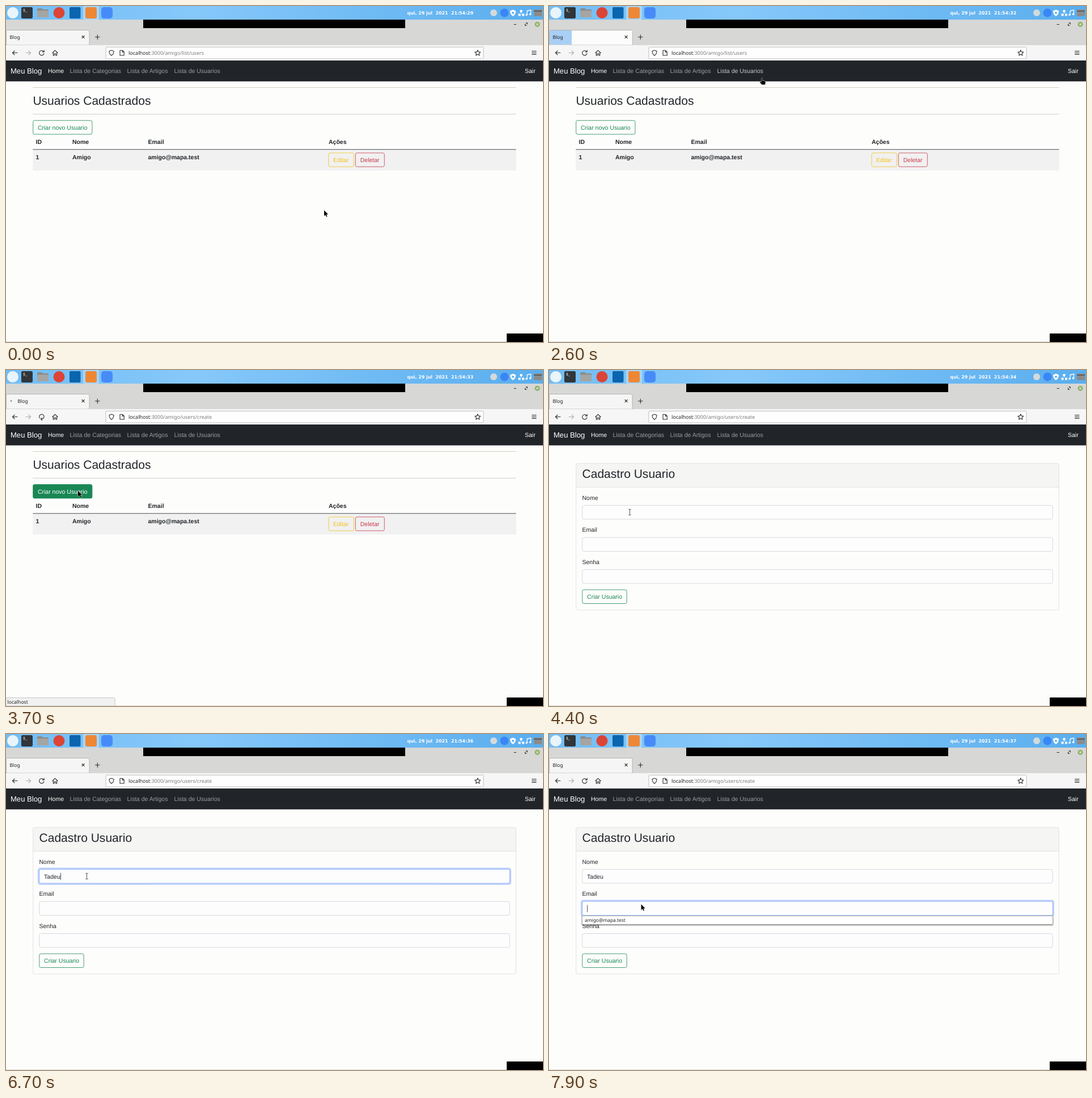
Write an HTML page that moves like this. It is 947 px wide and 592 px high and loops after 8000 ms.

```html
<!DOCTYPE html>
<html lang="pt-BR">
<head>
<meta charset="utf-8">
<title>Blog</title>
<style>
  html, body { margin: 0; width: 100%; height: 100%; overflow: hidden; background: #fdfdfc; }
  svg { display: block; width: 947px; height: 592px; }
  text { white-space: pre; text-rendering: geometricPrecision; }
  .web { font: 10.52px "Liberation Sans", Arial, sans-serif; fill: #212529; }
  .web .title { font-size: 21.04px; }
  .web .bold { font-weight: bold; }
  .ui { font: 8.6px "Noto Sans", "Open Sans", sans-serif; fill: #222; }
  .clock { font: bold 7.9px "DejaVu Sans", sans-serif; fill: #fff; }
  .line { fill: none; stroke: #2b2b2b; stroke-width: 1.1; stroke-linecap: round; stroke-linejoin: round; }
  .btn rect { fill: none; stroke: currentColor; stroke-width: .8; }
  .btn text { fill: currentColor; }
  .btn.hover rect { fill: #198754; }
  .btn.hover text { fill: #fff; }
  .green { color: #198754; }
  .amber { color: #f2c31a; }
  .red { color: #c8384a; }
  .field rect { fill: #fdfdfe; stroke: #c9cdd2; stroke-width: .75; }
  .field .glow { stroke: none; fill: none; }
  .field.focus rect { stroke: #86acf6; }
  .field.focus .glow { fill: #bfd0fb; stroke: none; }
  .nav { fill: #9a9c9e; }
  .nav.hover { fill: #c8c9ca; }
  .cursor { fill: #000; stroke: #fff; stroke-width: .9; paint-order: stroke; }
  #beam { fill: #2a2a2a; stroke-width: .5; }
  .off { display: none; }
</style>
</head>
<body>
<svg viewBox="0 0 947 592">
  <defs>
    <linearGradient id="sky">
      <stop offset="0" stop-color="#72bdf4"/>
      <stop offset=".35" stop-color="#86c8fa"/>
      <stop offset="1" stop-color="#5aaeee"/>
    </linearGradient>
    <filter id="drop" x="-2%" width="104%" y="-30%" height="180%">
      <feDropShadow dx="0" dy="1" stdDeviation="1.2" flood-opacity=".6"/>
    </filter>
  </defs>
  <rect width="947" height="592" fill="#fdfdfc"/>

  <!-- desktop panel -->
  <rect width="947" height="24" fill="url(#sky)"/>
  <circle cx="12" cy="12" r="10" fill="#e9f4fb"/>
  <rect x="27" y="2" width="20" height="20" rx="2.5" fill="#30363a"/>
  <text class="ui" x="30" y="10" style="font-size:7px;fill:#eee">$_</text>
  <path d="M55 6q0-2 2-2h6l2 2h8q2 0 2 2v10q0 2-2 2H57q-2 0-2-2Z" fill="#8a8a88"/>
  <rect x="55" y="8" width="20" height="12" rx="1.5" fill="#a5a5a2"/>
  <circle cx="93.5" cy="12" r="10" fill="#db4437"/>
  <rect x="112" y="2" width="19.5" height="20" rx="2" fill="#0b65ae"/>
  <rect x="136" y="0" width="28" height="24" fill="#a6d6fa"/>
  <rect x="140" y="2" width="20" height="20" rx="3" fill="#ee8734"/>
  <rect x="168" y="2" width="20" height="20" rx="5" fill="#478bf8"/>
  <text id="clock" class="clock" x="707.5" y="15"></text>
  <circle cx="860" cy="12" r="6" fill="#d3dadb"/>
  <circle cx="879" cy="12" r="7.5" fill="#3a86f5"/>
  <path d="M894 6.5l5 2q0 7-5 9.5q-5-2.5-5-9.5Z" fill="#fff"/>
  <circle cx="894" cy="12" r="2" fill="#62b3ee"/>
  <path d="M906.5 7h4v4h-4ZM903.5 13.5h4v4h-4ZM910 13.5h4v4h-4ZM908 11h1v2h-1Z" fill="#fff"/>
  <path d="M919 15.5V8.5l6.5-1.5v7.5" fill="none" stroke="#fff" stroke-width="1.3"/>
  <circle cx="918" cy="15.5" r="1.7" fill="#fff"/><circle cx="924.5" cy="14.5" r="1.7" fill="#fff"/>
  <rect x="931" y="6" width="14" height="12" rx="1" fill="#8b8c8a"/>
  <path d="M931 9h14" stroke="#5c5e5d" stroke-width="2"/>

  <!-- browser window -->
  <rect y="24" width="947" height="45" fill="#d7d7d6"/>
  <rect x="242" y="24" width="462" height="15"/>
  <path class="line" d="M896 32.5h3.5M916 33.5l-.5.8M918.5 30.5l.5-.7M915.5 32v2.3h2.3M917 29.8h2.2v2.2"/>
  <circle cx="937" cy="32.3" r="4.6" fill="#8fb36b"/>
  <path d="M935.3 30.6l3.4 3.4m0-3.4l-3.4 3.4" stroke="#fff" stroke-width="1"/>
  <path d="M.5 69V44.5q0-2 2-2h142q2.5 0 2.5 2.5v24Z" fill="#f5f5f5" stroke="#a9a9a9" stroke-width=".8"/>
  <g id="burst">
    <rect x="1" y="43" width="145.5" height="25" fill="#fcfcfc"/>
    <rect id="wave" x="1" y="43" height="25" fill="#a9cff5"/>
  </g>
  <circle id="spinner" cx="9" cy="54.5" r="1.1" fill="#444"/>
  <text id="tabTitle" class="ui" y="58">Blog</text>
  <path class="line" d="M134 52.5l4.2 4.2m0-4.2l-4.2 4.2M157.5 54.8h7.5M161.3 51v7.6"/>
  <rect y="69" width="947" height="27" fill="#f6f6f6"/>
  <path class="line" d="M20 82.5h-8.5m3.5-3.5l-3.5 3.5l3.5 3.5"/>
  <path class="line" d="M35 82.5h8.5m-3.5-3.5l3.5 3.5l-3.5 3.5" style="stroke:#b0b0b0"/>
  <g id="reload"><path class="line" d="M66.4 80.5a4.2 4.2 0 1 0 .6 3M67.2 78v3h-3"/></g>
  <path class="line" d="M82 82.5l4.5-4.3l4.5 4.3M83.3 82v5h2v-3h2.4v3h2v-5"/>
  <rect x="176" y="72.4" width="666" height="20.6" rx="1.5" fill="#fefefe" stroke="#b9b9b9" stroke-width=".9"/>
  <path class="line" d="M186 78l4 1.5q0 5.5-4 7.8q-4-2.3-4-7.8ZM201 78.3h4.5l2.7 2.7v6h-7.2ZM205.3 78.5v2.7h2.7"/>
  <text class="ui" x="216" y="86" style="font-size:9px">localhost<tspan id="path" fill="#7c7c7c"></tspan></text>
  <path class="line" d="M831.8 77.8l1.5 3.1l3.4.4l-2.5 2.3l.7 3.4l-3.1-1.7l-3.1 1.7l.7-3.4l-2.5-2.3l3.4-.4Z"/>
  <path class="line" d="M927.5 79.5h7.5m-7.5 2.8h7.5m-7.5 2.8h7.5"/>

  <!-- site -->
  <g class="web">
    <rect y="96" width="947" height="36.8" fill="#212529"/>
    <text x="7.9" y="119" style="font-size:13.15px;fill:#fff">Meu Blog</text>
    <text x="74" y="118.2" fill="#fff">Home</text>
    <text class="nav" x="112.4" y="118.2">Lista de Categorias</text>
    <text class="nav" x="213.5" y="118.2">Lista de Artigos</text>
    <text id="usersLink" class="nav" x="296.5" y="118.2">Lista de Usuarios</text>
    <text x="915" y="118.2" fill="#fff">Sair</text>

    <g id="listPage">
      <path d="M47.4 143.5h852.2M47.4 190.5h852.2" stroke="#cbcbbd" stroke-width=".9"/>
      <text class="title" x="47.4" y="174.3">Usuarios Cadastrados</text>
      <g id="newUser" class="btn green">
        <rect x="47.7" y="201.7" width="104.2" height="24.3" rx="2.6"/>
        <text x="55.9" y="217.6">Criar novo Usuario</text>
      </g>
      <rect x="47.4" y="253" width="852.2" height="36.7" fill="#f1f1f1"/>
      <path d="M47.4 252.8h852.2" stroke="#4a4d50" stroke-width="1.1"/>
      <g class="bold">
        <text x="52.6" y="243.3">ID</text><text x="117" y="243.3">Nome</text>
        <text x="250.5" y="243.3">Email</text><text x="569" y="243.3">Ações</text>
        <text x="52.6" y="270.3">1</text><text x="117" y="270.3">Amigo</text>
        <text x="250.5" y="270.3">amigo@mapa.test</text>
      </g>
      <g class="btn amber">
        <rect x="569" y="258.9" width="44.3" height="24.3" rx="2.6"/>
        <text x="577" y="274.9">Editar</text>
      </g>
      <g class="btn red">
        <rect x="616.3" y="258.9" width="51" height="24.3" rx="2.6"/>
        <text x="624.7" y="274.9">Deletar</text>
      </g>
    </g>

    <g id="formPage">
      <path d="M47.7 206.4V167.2q0-2.5 2.5-2.5h846.6q2.5 0 2.5 2.5v39.2Z" fill="#f5f5f4"/>
      <path d="M47.7 206.4h851.6" stroke="#dcdcdc" stroke-width=".8"/>
      <rect x="47.7" y="164.7" width="851.6" height="258" rx="2.6" fill="none" stroke="#dcdcdc" stroke-width=".8"/>
      <text class="title" x="58.5" y="190.2">Cadastro Usuario</text>
      <g id="fields"></g>
      <g class="btn green">
        <rect x="58.8" y="387.2" width="78.4" height="24.3" rx="2.6"/>
        <text x="67.1" y="403.2">Criar Usuario</text>
      </g>
      <text id="typed" x="67.1" y="254.5"></text>
      <rect id="caret" width=".8" height="12.5"/>
      <g id="suggest">
        <rect x="58.5" y="320.3" width="829.8" height="15" fill="#fff" stroke="#8a8a8a" stroke-width=".6" filter="url(#drop)"/>
        <text class="ui" x="63" y="331" style="font-size:8.4px">amigo@mapa.test</text>
      </g>
    </g>
  </g>

  <path d="M0 591.5h947" stroke="#d6d6c6" stroke-width=".8"/>
  <g id="status">
    <path d="M0 577.5h190q2 0 2 2v12.5H0Z" fill="#f1f1f1" stroke="#bcbcbc" stroke-width=".8"/>
    <text class="ui" x="2.5" y="588">localhost</text>
  </g>
  <rect x="883" y="577" width="64" height="15"/>

  <g id="pointer" class="cursor">
    <path id="arrow" d="M0 0V10L2.3 7.9L3.9 11.4L5.5 10.7L4 7.3H7.2Z"/>
    <path id="hand" d="M-1 1q0-1.3 1-1.3t1 1.3v3.2l4 .7q1.5.4 1.3 2l-.8 4.1H-.2L-3.8 6.8q-.3-1.2 1-1l1.8 1.2Z"/>
    <path id="beam" d="M-2.2-5.3H-.5L0-4.9L.5-5.3H2.2V-4.6H.4V4.6H2.2V5.3H.5L0 4.9L-.5 5.3H-2.2V4.6H-.4V-4.6H-2.2Z"/>
  </g>
</svg>
<script>
  const $ = id => document.getElementById(id);
  const show = (id, on) => $(id).classList.toggle('off', !on);
  const within = (t, from, to) => t >= from && t < to;
  const passed = (t, times) => times.filter(time => t >= time).length;

  $('fields').innerHTML = ['Nome', 'Email', 'Senha'].map((label, i) => {
    const y = 238.5 + i * 56.55;
    return `<text x="58.5" y="${y - 9.7}">${label}</text>
      <g class="field" id="field${label}">
        <rect class="glow" x="55.9" y="${y - 2.9}" width="835.1" height="30.2" rx="4.5"/>
        <rect x="58.8" y="${y}" width="829.3" height="24.4" rx="2.6"/>
      </g>`;
  }).join('');

  const LOOP = 8000;
  const ticks = [400, 1300, 2400, 3300, 4300, 5300, 6200, 7300];
  const keys = [5700, 6200, 6300, 6500, 6600];
  const name = 'Tadeu';
  // time, x, y
  const route = [
    [1500, 561, 360], [1700, 531, 367], [1900, 470, 290], [2100, 405, 175], [2300, 373, 123],
    [2600, 375.5, 127.5], [2800, 290, 160], [3200, 127, 213], [4000, 127, 213],
    [4400, 142.5, 250.5], [7200, 142.5, 250.5], [7500, 162.5, 300]
  ];

  function pointerAt(t) {
    const next = route.findIndex(p => p[0] > t);
    if (next < 1) return next ? route[route.length - 1].slice(1) : route[0].slice(1);
    const [a, b] = [route[next - 1], route[next]];
    const k = (t - a[0]) / (b[0] - a[0]);
    return [1, 2].map(i => a[i] + (b[i] - a[i]) * k);
  }

  function burstWidth(t) {
    const start = t < 4100 ? 2500 : 4100;
    return [20, 39, 90][Math.floor((t - start) / 100)] || 0;
  }

  function draw(t) {
    const created = t >= 3400;
    const loading = within(t, 3400, 4000);
    const form = t >= 4000;
    const onEmail = t >= 7800;

    $('clock').textContent = `qui, 29 jul  2021  21:54:${29 + passed(t, ticks)}`;
    $('path').textContent = ':3000/amigo/' + (created ? 'users/create' : 'list/users');
    $('tabTitle').setAttribute('x', loading ? 20.5 : 6.5);
    $('reload').setAttribute('transform', loading ? 'rotate(130 63 82.5)' : '');
    show('spinner', loading);
    show('status', loading);

    const wave = burstWidth(t);
    show('burst', wave);
    $('wave').setAttribute('width', wave);

    show('listPage', !form);
    show('formPage', form);
    $('usersLink').classList.toggle('hover', within(t, 2200, 2700));
    $('newUser').classList.toggle('hover', t >= 3100);

    $('fieldNome').classList.toggle('focus', within(t, 4700, 7800));
    $('fieldEmail').classList.toggle('focus', onEmail);
    $('typed').textContent = name.slice(0, passed(t, keys));
    show('caret', within(t, 4700, 7100) || onEmail);
    $('caret').setAttribute('x', onEmail ? 67.3 : 67.3 + $('typed').getComputedTextLength());
    $('caret').setAttribute('y', onEmail ? 301.2 : 244.7);
    show('suggest', t >= 7900);

    const shape = within(t, 2200, 2700) ? 'hand' : within(t, 4300, 7800) ? 'beam' : 'arrow';
    for (const id of ['arrow', 'hand', 'beam']) show(id, id === shape);
    $('pointer').setAttribute('transform', `translate(${pointerAt(t)})`);
  }

  const origin = performance.now();
  let last = -1;
  function frame() {
    const elapsed = Math.max(0, performance.now() - origin) % LOOP;
    const t = Math.floor(elapsed / 100) * 100;
    if (t !== last) draw(last = t);
    requestAnimationFrame(frame);
  }
  frame();
</script>
</body>
</html>
```
